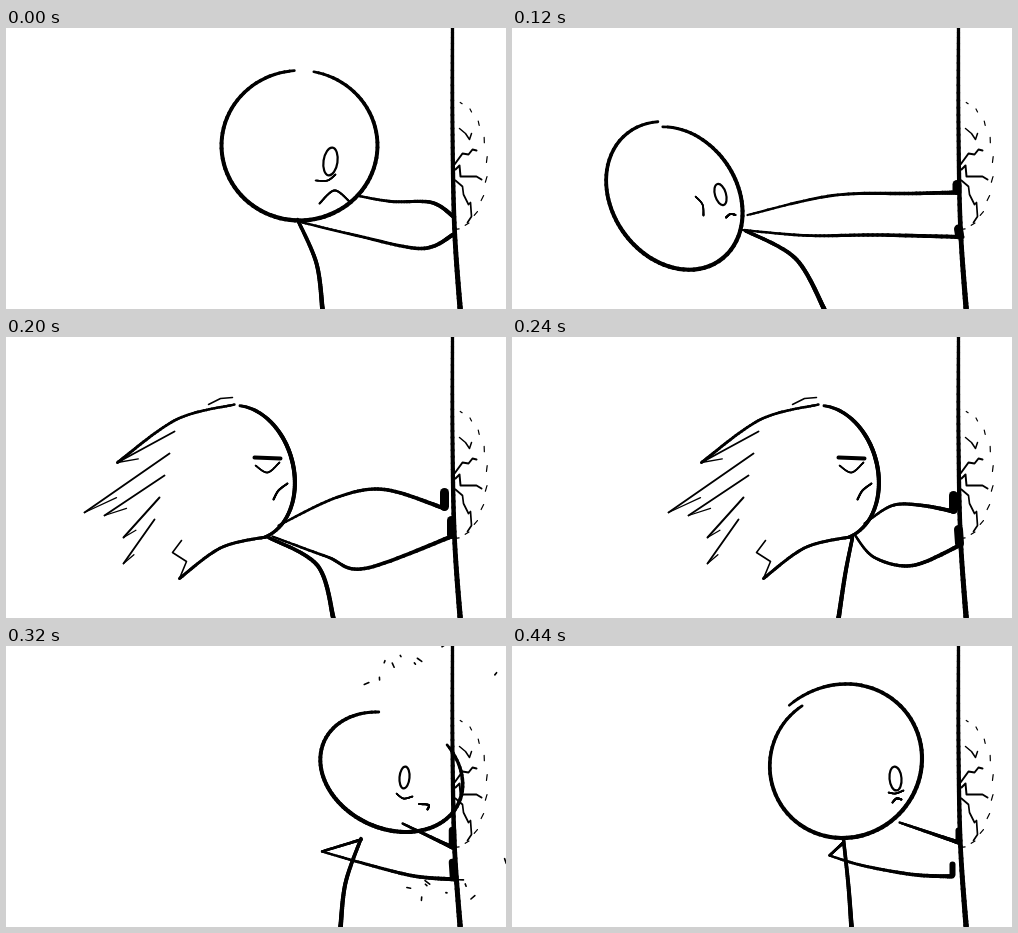
Write an HTML page with a canvas that moves like this. It is 500 px wide and 281 px high and loops after 0.48 s.

```html
<!DOCTYPE html>
<html lang="en">
<head>
<meta charset="utf-8">
<title>Headbutt</title>
<style>
  html, body { margin: 0; width: 100%; height: 100%; overflow: hidden; background: #fff; }
  canvas { display: block; width: 500px; height: 281px; }
</style>
</head>
<body>
<canvas id="stage" width="500" height="281"></canvas>
<script>
const ctx = document.getElementById('stage').getContext('2d');
const STEP = 40, RAD = Math.PI / 180;
ctx.lineCap = ctx.lineJoin = 'round';

// Start and end width of each kind of limb or face stroke.
const WEIGHTS = {
  armT: [2.2, 4.2], armB: [2.2, 4.2], fold: [3, 2.4], body: [3.4, 4.6], lid: [1.6, 1.8], mouth: [2, 2]
};
const LIMBS = ['armT', 'armB', 'fold', 'body'], FACE = ['lid', 'mouth'];

// head: x, y, long radius, short radius, tilt, first angle, sweep, curl of the loose ends
// eye:  x, y, half width, half height, tilt
// fist: width, height
// Everything else is a few points on a smooth curve.
const stand = {
  head: [293, 117, 78, 75, 0, -94, -345, 0],
  eye: [324, 133, 7, 14, 8],
  lid: [309,152, 321,152, 329,146],
  mouth: [313,175, 328,162, 343,173],
  armT: [350,167, 385,173, 425,174, 447,188],
  armB: [292,193, 350,207, 415,220, 447,206],
  body: [291,191, 310,235, 316,281]
};
const lean = {
  head: [186, 150, 79, 59, 62, -95, -328, 0.1],
  eye: [232, 155, 5, 12, -18],
  mouth: [233,190, 238,178, 246,174],
  armT: [253,171, 320,164, 400,168, 445,167],
  armB: [250,197, 300,204, 360,208, 450,213],
  body: [250,197, 296,231, 315,281],
  fist: [9, 8]
};
const back = {
  head: [138, 187, 77, 65, 45, -110, -386, -0.03],
  eye: [184, 177, 6, 10, -15],
  lid: [183,168, 190,176, 191,187],
  mouth: [194,188, 198,193, 200,199],
  armT: [217,202, 320,170, 400,162, 444,161],
  armB: [210,206, 290,210, 370,205, 450,204],
  body: [215,207, 270,229, 309,281],
  fist: [9, 8]
};
const swing = {
  head: [237, 135, 68, 50, 75, -93, 168, 0],
  lid: [249,128, 261,135, 273,125],
  mouth: [267,162, 272,153, 281,146],
  armT: [272,188, 330,160, 378,152, 438,171],
  armB: [266,199, 320,219, 358,231, 445,199],
  body: [262,200, 311,228, 327,281],
  fist: [9, 16],
  hair: true
};
const lunge = {
  ...swing,
  dash: 78,
  armT: [352,186, 380,168, 410,168, 441,174],
  armB: [342,197, 362,220, 400,228, 447,208],
  body: [340,200, 333,235, 326,281]
};
const hit = {
  head: [412, 133, 73, 45, 95, -79, -206, 0],
  mouth: [430,157, 440,156, 446,159],
  fold: [374,193, 309,204],
  armB: [309,204, 345,216, 400,230, 451,236],
  body: [374,194, 337,233, 325,281],
  fist: [9, 20],
  smash: true
};
const rest = {
  head: [358, 118, 75, 68, -45, -125, -362, 0],
  eye: [398, 131, 5, 11, 5],
  lid: [390,147, 397,152, 406,150],
  mouth: [395,158, 404,161, 396,167],
  armT: [396,177, 446,201],
  fold: [336,193, 322,206],
  armB: [322,206, 370,218, 415,229, 449,230],
  body: [335,190, 341,240, 343,281],
  fist: [6, 14]
};
const rise = {
  head: [333, 115, 78, 75, -45, -128, -367, -0.06],
  eye: [383, 132, 6, 12, -5],
  lid: [376,146, 383,147, 391,144],
  mouth: [380,156, 384,152, 389,153],
  armT: [387,176, 446,196],
  fold: [331,196, 317,209],
  armB: [317,209, 350,219, 400,228, 440,230],
  body: [331,193, 336,240, 339,281],
  fist: [6, 12]
};

const lerp = (a, b, k) => a + (b - a) * k;

// Halfway pose; parts missing from one side come from the other's end state.
function between(a, b) {
  const pose = {};
  for (const key in b)
    if (Array.isArray(b[key])) pose[key] = a[key] ? b[key].map((v, i) => lerp(a[key][i], v, 0.5)) : b[key];
  return pose;
}

const poses = [
  stand, between(stand, lean), lean, between(lean, back), back, swing,
  lunge, hit, between(hit, rest), rest, between(rest, rise), rise
];

function line(w, ...p) {
  ctx.lineWidth = w;
  ctx.beginPath();
  for (let i = 0; i < p.length; i += 2) ctx.lineTo(p[i], p[i + 1]);
  ctx.stroke();
}

// Draws at(u), u from 0 to 1, with a width that follows width(u).
function brush(at, width, n = 48) {
  let last = at(0);
  for (let s = 1; s <= n; s++) {
    const next = at(s / n);
    line(width(s / n), ...last, ...next);
    last = next;
  }
}

// Catmull-Rom curve through the given points.
function curve(w0, w1, ...p) {
  const n = p.length / 2;
  const at = u => {
    const i = Math.min(n - 2, Math.floor(u * (n - 1))), t = u * (n - 1) - i;
    return [0, 1].map(axis => {
      const [a, b, c, d] = [-1, 0, 1, 2].map(j => p[Math.max(0, Math.min(n - 1, i + j)) * 2 + axis]);
      return b + t / 2 * (c - a + t * (2 * a - 5 * b + 4 * c - d + t * (3 * (b - c) + d - a)));
    });
  };
  brush(at, u => lerp(w0, w1, u));
}

function drawHead([x, y, a, b, tilt, from, sweep, curl]) {
  brush(u => {
    const angle = (from + sweep * u) * RAD, local = angle - tilt * RAD;
    const r = (1 + curl * (1 - 2 * u) ** 5) / Math.hypot(Math.cos(local) / a, Math.sin(local) / b);
    return [x + r * Math.cos(angle), y + r * Math.sin(angle)];
  }, u => 2.6 + 1.6 * Math.sqrt(Math.sin(Math.PI * Math.min(u, 0.999))), 90);
}

function drawEye([x, y, rx, ry, tilt]) {
  ctx.lineWidth = 2.2;
  ctx.beginPath();
  ctx.ellipse(x, y, rx, ry, tilt * RAD, 0, 2 * Math.PI);
  ctx.stroke();
}

// Torn streaks trailing behind the fast head.
function drawHair() {
  curve(2.4, 3, 228,67, 170,82, 111,125);
  curve(3, 3, 262,199, 215,210, 173,241);
  line(1.6, 173,241, 180,224, 166,215, 175,203);
  line(1.5, 202,67, 214,61, 226,60);
  line(4, 248,120, 274,121);
  const tips = [[111,125], [78,175], [98,178], [117,200], [117,226]];
  const root = i => [168 - 5 * i, 94 + 22 * i];
  tips.forEach(([x, y], i) => {
    const [nx, ny] = root(i + 1);
    line(1.9, ...root(i), x, y);
    line(1.3, x, y, lerp(x, nx, 0.4), lerp(y, ny, 0.4));
  });
}

// Face flattened against the wall.
function drawSmash() {
  curve(4, 3.5, 425,65, 435,68, 440,63, 446,70);
  curve(4, 3.5, 429,201, 435,192, 440,201, 447,202);
  curve(1.6, 1.6, 379,134, 374,172, 397,189);
  curve(2, 2, 394,205, 403,212, 416,206);
  line(2.4, 419,120, 447,139);
  line(6, 425,135, 430,135);
  for (let i = 0; i < 4; i++) line(2.2, 419 + 3 * i, 224 - 4 * i, 426 + 3 * i, 221 - 4 * i);
  curve(1, 1, 320,97, 336,93, 354,91);
  line(1, 351,106, 372,101);
  line(1, 368,77, 377,95);
  line(1, 337,183, 355,191);
}

function seeded(seed) {
  return () => (seed = seed * 16807 % 2147483647) / 2147483647;
}

// Specks thrown out on a growing, thinning ring.
function drawBurst(k) {
  const rnd = seeded(41);
  for (let i = 0; i < 36; i++) {
    const angle = lerp(-130, 110, rnd()) * RAD, far = lerp(0.92, 1.1, rnd()), turn = 6 * rnd(), size = lerp(0.5, 3, rnd());
    if (i > 36 - 20 * k) break;
    const x = 430 + (55 + 110 * k) * far * Math.cos(angle), y = 127 + (102 + 33 * k) * far * Math.sin(angle);
    const dx = size * Math.cos(turn), dy = size * Math.sin(turn);
    line(1.6, x - dx, y - dy, x + dx, y + dy);
  }
}

function drawWall() {
  curve(3.2, 5.4, 446,-4, 446,100, 448,200, 454,285);
  line(2, 448,136, 456,125, 462,126, 466,121, 470,122);
  line(2, 449,141, 453,137, 454,148, 470,148, 475,151);
  line(1.7, 449,152, 456,158, 457,166, 462,176, 464,174, 465,188, 461,194);
  line(1.5, 453,100, 459,105, 463,111, 465,105);
  // Hairlines along the rim of the dent.
  for (let i = 0; i < 10; i++) {
    const a = (-80 + 18 * i) * RAD, b = a + 0.09;
    line(1.2, 448 + 33 * Math.cos(a), 137 + 64 * Math.sin(a), 447 + 33 * Math.cos(b), 137 + 64 * Math.sin(b));
  }
}

function drawFist(arm, [w, h]) {
  const [x, y] = arm.slice(-2);
  line(w, Math.min(x, 446), y - h, Math.min(x, 447), y - 2);
}

function draw(step) {
  const pose = poses[step];
  const strokes = keys => keys.forEach(key => pose[key] && curve(...WEIGHTS[key], ...pose[key]));
  ctx.setTransform(1, 0, 0, 1, 0, 0);
  ctx.fillStyle = '#fff';
  ctx.fillRect(0, 0, 500, 281);
  ctx.translate(0.5, 0.5);
  drawWall();
  strokes(LIMBS);
  if (pose.fist) for (const arm of [pose.armT, pose.armB]) if (arm) drawFist(arm, pose.fist);
  if (pose.smash) drawSmash();
  if (step > 6 && step < 11) drawBurst((step - 7) / 2);
  ctx.translate(pose.dash || 0, 0);
  drawHead(pose.head);
  strokes(FACE);
  if (pose.eye) drawEye(pose.eye);
  if (pose.hair) drawHair();
}

let shown = -1;
const start = performance.now();
function tick() {
  const step = Math.floor((performance.now() - start) / STEP) % poses.length;
  if (step !== shown) draw(shown = step);
  requestAnimationFrame(tick);
}
tick();
</script>
</body>
</html>
```
